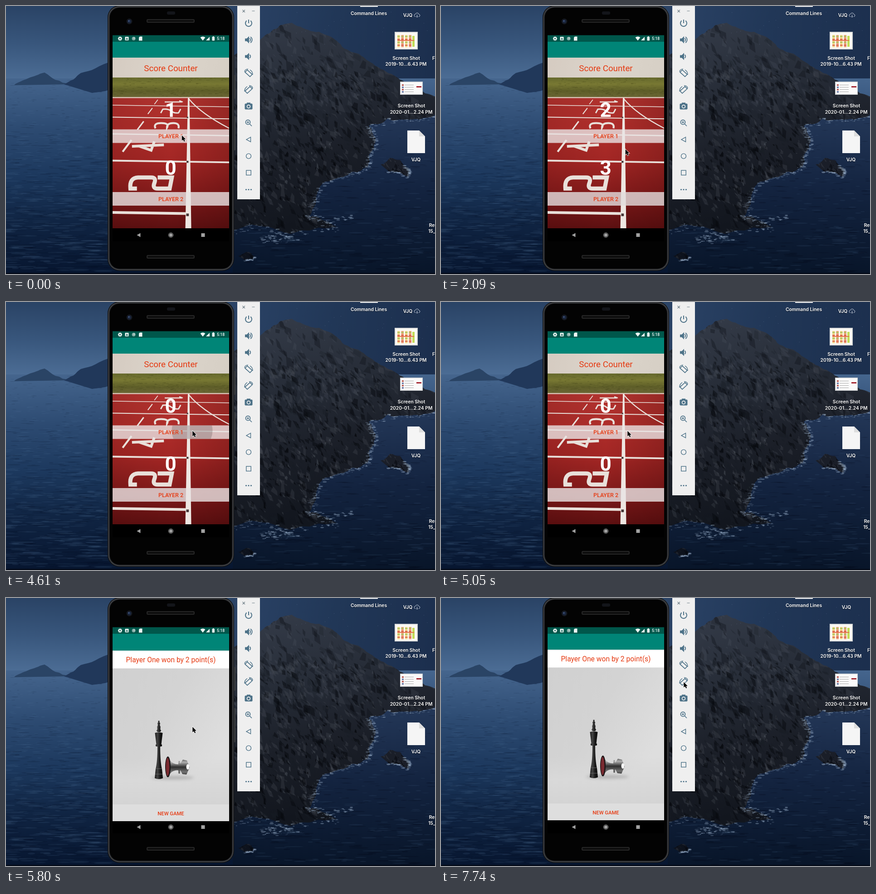
An HTML page with a canvas that plays this animation: 946x592 px, repeating every 8 s.

```html
<!DOCTYPE html>
<html lang="en">
<head>
<meta charset="utf-8">
<title>Score Counter</title>
<style>
html, body { margin: 0; width: 946px; height: 592px; overflow: hidden; background: #0b1930; }
canvas { display: block; }
</style>
</head>
<body>
<canvas id="stage" width="946" height="592"></canvas>
<script>
const W = 946, H = 592, LOOP = 8000, STEP = 148.4;
const RED = '#e63a12', TEAL = '#008577', ROBOTO = 'Roboto, sans-serif';
const LEFT = 235, WIDE = 257, MID = 363.5;
let g = document.getElementById('stage').getContext('2d'), seed = 7;

const rnd = () => (seed = (seed * 16807) % 2147483647) / 2147483647;
const between = (a, b) => a + (b - a) * rnd();
const pick = list => list[Math.floor(rnd() * list.length)];
const times = (n, f) => { for (let i = 0; i < n; i++) f(i); };

function layer(paint) {
  const c = document.createElement('canvas'), old = g;
  c.width = W; c.height = H;
  g = c.getContext('2d');
  paint();
  g = old;
  return c;
}
function rect(x, y, w, h, fill) { g.fillStyle = fill; g.fillRect(x, y, w, h); }
function round(x, y, w, h, r, fill) {
  g.fillStyle = fill; g.beginPath(); g.roundRect(x, y, w, h, r); g.fill();
}
function disc(x, y, r, fill, ry = r) {
  g.fillStyle = fill; g.beginPath(); g.ellipse(x, y, r, ry, 0, 0, 7); g.fill();
}
function ring(x, y, r, color, w) {
  g.strokeStyle = color; g.lineWidth = w; g.beginPath(); g.arc(x, y, r, 0, 7); g.stroke();
}
const asPath = d => d instanceof Path2D ? d : new Path2D(d);
function shape(d, fill) { g.fillStyle = fill; g.fill(asPath(d)); }
function line(d, color, w = 1) { g.strokeStyle = color; g.lineWidth = w; g.stroke(asPath(d)); }
function text(s, x, y, font, fill) {
  g.font = font; g.fillStyle = fill; g.textAlign = 'center'; g.fillText(s, x, y);
}
// Evenly spaced colour stops
function fade(x0, y0, x1, y1, ...colors) {
  const f = g.createLinearGradient(x0, y0, x1, y1);
  colors.forEach((c, i) => f.addColorStop(i / (colors.length - 1), c));
  return f;
}
const down = (y0, y1, ...colors) => fade(0, y0, 0, y1, ...colors);
function inside(d, paint) { g.save(); g.clip(asPath(d)); paint(); g.restore(); }
function at(x, y, paint) { g.save(); g.translate(x, y); paint(); g.restore(); }

// Coastal night scene
function jagged(points, depth = 4, rough = .13) {
  if (!depth) return points;
  const out = [points[0]];
  points.slice(1).forEach(([x, y], i) => {
    const [px, py] = points[i], d = Math.hypot(x - px, y - py) * rough;
    out.push([(x + px) / 2 + between(-d, d), (y + py) / 2 + between(-d, d)], [x, y]);
  });
  return jagged(out, depth - 1, rough);
}
function crags(n, x0, y0, x1, y1, size, colors) {
  times(n, () => {
    const s = between(.25, 1) * size, r = (a, b) => between(a, b) * s;
    shape(`M${between(x0, x1)} ${between(y0, y1)}l${r(.2, .8)} ${r(.1, .6)}l${r(-.1, .5)} ${r(.4, 1)}l${r(-.8, -.3)} ${r(-.6, -.1)}z`, pick(colors));
  });
}
function ripplesOnSea(n, x0, x1, y0, colors) {
  times(n, () => {
    const y = between(y0, H), k = .4 + (y - y0) / 300;
    disc(between(x0, x1), y, between(4, 16) * k, pick(colors), between(.5, 1.3) * k);
  });
}
function rock(points, fill, foamSize) {
  const edge = jagged(points, 3), d = 'M' + edge.join('L') + 'z';
  shape(d, fill);
  inside(d, () => crags(40, points[0][0], points[0][1] - 20, points[0][0] + 70, points[0][1] + 20, 14,
    ['rgba(4,6,12,.5)', 'rgba(80,86,98,.25)']));
  edge.filter(p => p[1] > points[0][1]).forEach(p => foam(p, foamSize));
}
function foam([x, y], spread) {
  times(3, () => disc(x + between(-spread, spread), y + between(-.2, 1) * spread,
    between(1, 5), `rgba(160,182,208,${between(.12, .5)})`, between(.5, 1.5)));
}
function coast() {
  rect(0, 0, W, 165, down(0, 165, '#2a4365', '#38567c', '#4d6e96'));
  rect(500, 0, 446, 260, fade(500, 0, 946, 100, '#2b4366', '#213757', '#1c2f4e'));
  rect(0, 160, W, 432, down(160, H, '#45658d', '#2d4b72', '#1c385d', '#0f2341', '#071630'));
  rect(500, 225, 446, 367, down(225, H, '#25395a', '#13233f', '#081529'));
  ripplesOnSea(900, 0, 230, 164, ['rgba(110,145,185,.1)', 'rgba(4,14,34,.15)']);
  ripplesOnSea(500, 520, W, 250, ['rgba(100,135,175,.1)', 'rgba(0,6,20,.22)']);
  shape('M' + jagged([[18, 175], [48, 160], [85, 147], [137, 173]], 3, .06).join('L'), '#2a4465');
  shape('M' + jagged([[128, 173], [165, 148], [230, 124], [230, 184], [190, 192]], 3, .06).join('L'), '#21385a');

  const ridge = jagged([[500, 110], [560, 75], [606, 42], [630, 37], [712, 66], [746, 94], [850, 150], [946, 200]], 4, .07);
  const shore = jagged([[946, 240], [800, 264], [815, 297], [798, 355], [690, 402], [668, 465], [730, 488], [500, 496]]);
  const land = 'M' + ridge.concat(shore).join('L') + 'z';
  shape(land, fade(600, 40, 700, 470, '#333a47', '#272d38', '#1b1f28', '#12161e'));
  inside(land, () => {
    crags(420, 500, 30, 946, 260, 26, ['rgba(92,98,110,.16)', 'rgba(10,13,20,.32)', 'rgba(30,35,44,.35)']);
    crags(1100, 500, 130, 850, 500, 20, ['rgba(5,7,12,.45)', 'rgba(88,92,101,.22)', 'rgba(24,28,36,.4)']);
    crags(150, 500, 260, 830, 500, 11, ['rgba(125,130,138,.25)', 'rgba(0,2,6,.6)']);
  });
  shore.forEach(p => foam(p, p[1] > 430 ? 10 : 6));
  times(30, () => foam([between(550, 650), between(500, 520)], 6));
  times(6, () => foam([between(728, 775), between(462, 474)], 4));
  rock([[826, 350], [846, 336], [868, 340], [890, 362], [886, 377], [845, 366]], '#1a1e28', 3);
  rock([[512, 552], [535, 543], [547, 555], [528, 562]], '#0d121c', 3);
  times(30, () => disc(between(640, 940), between(2, 90), .5, 'rgba(170,190,220,.35)'));
  rect(0, 589.5, W, 3, '#050b18');
}

// Desktop files
function label(s, x, y) {
  g.shadowColor = 'rgba(0,0,0,.6)'; g.shadowBlur = 2; g.shadowOffsetY = 1;
  text(s, x, y, '600 10.3px Inter, sans-serif', '#fff');
  g.shadowColor = 'transparent';
}
function files() {
  rect(781, 0, 39, 2, '#f2f2f2');
  label('Command Lines', 800, 20);
  rect(857, 57, 51, 39, '#d9dadb'); rect(859, 59, 47, 35, '#fbfaf4');
  times(4, c => {
    rect(863 + c * 8.5, 64, 5.5, 27, c % 2 ? '#eda07c' : '#f3d98c');
    times(4, r => rect(863 + c * 8.5, 66 + r * 6.5, 5.5, 2.5, r % 2 ? '#d9664f' : '#a9c25e'));
  });
  rect(896, 66, 5, 24, '#c3dc58');
  rect(863, 75, 37, 2, '#e3744f');
  label('Screen Shot', 882.5, 119);
  label('2019-10...6.43 PM', 882, 132);
  rect(869, 167, 50, 29, '#d6d8da'); rect(870.5, 168.5, 47, 26, '#fafafa');
  rect(905, 177, 11, 3, '#a52b36');
  times(4, r => {
    rect(873, 173 + r * 5, 4, 3.4, r % 2 ? '#6878a4' : '#b65a55');
    rect(879, 174 + r * 5, 20, 1, '#aaa');
  });
  label('Screen Shot', 894, 224);
  label('2020-01...2.24 PM', 893.5, 237.5);
  shape('M885 275H911L924 288V325H885z', '#f5f5f5');
  shape('M911 275V288H924z', '#dedede');
  label('VJQ', 904, 343);
  label('F', 943, 119);
  label('Re', 939, 488);
  label('15_', 939, 501);
}

// Emulator side panel: icons drawn around their own centres
function speaker(waves) {
  return ink => {
    shape('M-8 -3h4l5 -5v16l-5 -5h-4z', ink);
    times(waves, i => { g.beginPath(); g.arc(0, 0, 4.2 + i * 3.5, -1, 1); g.stroke(); });
  };
}
function turn(side) {
  return ink => {
    g.scale(side, 1);
    line('M-3 -7L8 3 3 8 -8 -2z', ink, 1.7);
    line('M-9 -3Q-8 -9 -1 -9M9 4Q9 -4 3 -7', ink, 1.4);
  };
}
const icons = [
  ink => { line('M0 -8V0', ink, 2); g.beginPath(); g.arc(0, 0, 7, -.9, Math.PI + .9); g.stroke(); },
  speaker(2), speaker(1), turn(1), turn(-1),
  ink => {
    round(-8.5, -6, 17, 13, 2, ink); rect(-4, -8, 8, 3, ink);
    disc(0, .5, 4.3, '#efefef'); disc(0, .5, 2.6, ink);
  },
  ink => { ring(-1.5, -1.5, 5, ink, 1.7); line('M2 2L7 7M-4 -1.5h5M-1.5 -4v5', ink, 1.6); },
  ink => line('M4.5 -5.2v10.4l-9.5 -5.2z', ink, 1.4),
  ink => ring(0, 0, 5.5, ink, 1.4),
  ink => { g.lineWidth = 1.4; g.strokeRect(-5.2, -5.2, 10.4, 10.4); },
  ink => times(3, i => disc(i * 5.5 - 5.5, .5, 1.6, ink)),
];
function panel() {
  const ink = '#4d7288';
  rect(510, 0, 50, 427, '#efefef');
  line('M521.5 8.5l5.5 5.5m0-5.5l-5.5 5.5M542.5 11h6', '#71818a', 1.1);
  icons.forEach((icon, i) => at(535, 38 + i * 36.7, () => {
    g.strokeStyle = ink; g.lineWidth = 1.8;
    icon(ink);
  }));
}

function phone() {
  round(500, 152, 6, 53, 2, '#3b3d40');
  round(500, 243, 6, 76, 2, '#3b3d40');
  ['#131416', '#46484b', '#232427', '#030303'].forEach((c, i) =>
    round(224 + i * 1.6, -1 + i * 1.6, 279 - i * 3.2, 586 - i * 3.2, 26 - i * 1.6, c));
  round(355, 12, 18, 7, 3, '#13151a');
  disc(272, 34, 6.5, '#14171d'); disc(272, 34, 4, '#1b2740'); disc(271, 33, 1.5, '#4a6088');
  for (const y of [29, 550]) {
    round(310, y, 106, 8, 3, '#262626');
    round(312, y + 2, 102, 4, 2, '#0d0d0d');
  }
}

// Running track: everything painted on the ground grows with y
const figures = [
  'M-1 0H.9M.6 -.7L1 0',
  'M-.9 .8L-.7 -.7Q-.2 -1 .1 0T.8 .7L1 -.8',
  'M-.9 .8Q-1.1 -.7 -.45 -.7T0 .6Q0 -.7 .5 -.7T.9 .8',
  'M-1 .1L1 -.2M.4 -.9L.2 .9L-.6 0',
  'M-.65 .75H-.95Q-1 -.7 -.6 -.75H0Q.25 -.75 .15 0T.3 .75H.85L.95 -.75H.3',
];
const spots = [[370, 212], [362, 232], [355, 264], [313, 309], [320, 391]];

function track() {
  const paint = '#e9e0da';
  rect(LEFT, 79, WIDE, 35, TEAL);
  rect(LEFT, 114, WIDE, 44, fade(LEFT, 114, 492, 158, '#d5cbc1', '#dcd5cb', '#d6cfc5'));
  rect(LEFT, 158, WIDE, 44, down(158, 202, '#65682c', '#787833', '#5d5d28', '#6b6635'));
  rect(LEFT, 202, WIDE, 289, down(202, 491, '#b2332f', '#af2d2a', '#a22624', '#811a1a', '#5d1011'));
  rect(LEFT, 202, WIDE, 289, fade(LEFT, 0, 492, 0, 'rgba(50,0,0,.12)', 'rgba(50,0,0,0)', 'rgba(40,0,0,.2)'));
  inside('M235 158H492V491H235z', () => {
    times(350, () => rect(between(LEFT, 492), between(158, 200), between(2, 8), 1, pick(['rgba(40,42,14,.2)', 'rgba(150,145,75,.15)'])));
    rect(LEFT, 201, WIDE, 2.5, '#d7c3b5');
    for (const y of [219, 245.5, 282.5, 341.5, 456]) {
      const end = y > 400 ? 400 : 492;
      line(`M${LEFT} ${y}L${end} ${y + (end - LEFT) * .015}`, paint, 1.5 + (y - 219) * .019);
    }
    line('M403 205Q430 238 492 270', paint, 2.4);
    shape('M401 203H404.5L408.5 491H395.5z', '#eee7e2');
    for (const y of [246, 344, 461]) rect(400 - y / 180, y - y / 180, y / 80, y / 80, '#453536');
    spots.forEach(([x, y], i) => {
      const p = new Path2D(), w = 20 + (y - 212) * .157, h = (y - 150) * .068;
      p.addPath(new Path2D(figures[i]), new DOMMatrix([w, 0, 0, h, x, y]));
      line(p, paint, h * .55);
      if (i < 4) line(`M${331 - (y - 212) * .66 + h * .9} ${y - h * 1.2}l${-h * 1.8} ${h * 2.4}`, paint, h * .4);
    });
    for (const y of [272.5, 411]) rect(LEFT, y, WIDE, 30, 'rgba(234,229,229,.8)');
  });
  text('Score Counter', MID, 143.5, `18.75px ${ROBOTO}`, RED);
}

// Result screen
function result() {
  rect(LEFT, 79, WIDE, 35, TEAL);
  rect(LEFT, 114, WIDE, 40, '#fff');
  rect(LEFT, 114, WIDE, 1.5, '#dedede');
  rect(LEFT, 153.5, WIDE, 300.5, fade(LEFT, 154, 492, 300, '#d0d0d0', '#d3d3d3', '#dedede'));
  rect(LEFT, 350, WIDE, 104, down(350, 454, 'rgba(216,216,216,0)', '#d9d9d9', '#d4d4d4'));
  rect(LEFT, 454, WIDE, 37, '#dedede');
  g.filter = 'blur(3px)';
  disc(367, 395, 47, 'rgba(90,90,90,.3)', 4);
  g.filter = 'none';

  const black = fade(328, 0, 346, 0, '#151515', '#444', '#161616', '#0c0c0c');
  times(3, i => { round(335.5 - i, 269 + i * 8, 3 + i * 2, 9, 1, black); disc(337, 275 + i * 8, 3 + i, black, 2); });
  shape('M328.5 296q8 -3 17 0L342.5 321H331.5z', black);
  round(330, 321, 14, 5, 2, black);
  shape('M334 326H340Q340 360 344 376L346 396Q337 400 328 396L330 376Q334 360 334 326z', black);
  line('M330 375H344M329 387H345', '#777', .8);

  const steel = down(350, 393, '#232323', '#b0b0b0', '#303030', '#737373', '#151515');
  shape('M357 350Q366 367 382 365V379Q366 376 357 393z', steel);
  round(380, 358, 4, 28, 2, steel);
  shape('M384 364L390 355 399 357 405 372 398 388 389 387 384 378z', steel);
  disc(357, 371, 6, '#191516', 23);
  disc(356.5, 371, 4, '#792a30', 20);
  disc(401, 371, 3.5, '#f7f7f7', 6);
  text('Player One won by 2 point(s)', MID, 140, `15.625px ${ROBOTO}`, RED);
  text('NEW GAME', MID, 478.3, `500 11.25px ${ROBOTO}`, RED);
}

function bars() {
  const dark = '#00574b', c = '#eef5f3', grey = '#a2a2a2';
  rect(LEFT, 64.5, WIDE, 14.5, dark);
  at(251.5, 72, () => {
    times(8, () => { g.rotate(Math.PI / 4); rect(-1, -4.6, 2, 4, c); });
    disc(0, 0, 3.4, c); disc(0, 0, 1.5, dark);
  });
  round(262.5, 68, 8, 8, 1, c);
  text('A', 266.5, 74.7, `700 7px ${ROBOTO}`, dark);
  disc(281.5, 72, 4, '#7fa9a2'); disc(282.5, 71, 2.6, '#a6c4bf');
  shape('M295 67.5h5.5v9h-7.5v-7z', c);
  shape('M428.5 69.5q5.5 -4 11 0l-5.5 7z', c);
  shape('M449 68v8h-8z', c);
  round(454.5, 68, 5.5, 8.5, 1, c); rect(456, 67, 2.5, 1.5, c);
  text('5:18', 473.5, 75.2, `500 8.75px ${ROBOTO}`, '#fff');
  shape('M296.5 501.5v9l-8 -4.5z', grey);
  disc(MID, 506, 3.8, grey); ring(MID, 506, 5.2, grey, 1);
  rect(430.5, 502, 8, 8, grey);
}

// Motion, counted in steps. Moves: start, end, x, y
const moves = [[4, 7, 389, 431], [12, 17, 410.5, 284], [45, 52, 534.5, 185]];
const taps = [[2, 19, 26, 31, 38], [8, 10, 12]];
const RESET = 31, SWITCH = 38;
const rowTop = [272.5, 411];
const easeOut = p => 1 - (1 - p) ** 3;

function pointer(n) {
  return moves.reduce(([x, y], [a, b, tx, ty]) => {
    const k = easeOut(Math.min(1, Math.max(0, (n - a) / (b - a))));
    return [x + (tx - x) * k, y + (ty - y) * k];
  }, [387, 285]);
}
function scores(n) {
  const [one, two] = taps.map(list => list.filter(s => s <= n).length);
  return [(1 + one) % 5, n < RESET ? two : 0];
}
function game(n) {
  g.drawImage(trackArt, 0, 0);
  scores(n).forEach((score, i) => {
    const top = rowTop[i];
    for (const age of taps[i].map(s => n - s).filter(a => a >= 0 && a < 3 && n < SWITCH)) {
      const [x, y] = pointer(n - age);
      inside(`M237 ${top}H492v30H237z`, () => disc(x, y, 45 + age * 55, `rgba(70,60,60,${.24 * .4 ** age})`));
    }
    text(score, 363, i ? 373 : 245, `700 44px ${ROBOTO}`, '#fff');
    text('PLAYER ' + (i + 1), MID, top + 19.8, `500 12.5px ${ROBOTO}`, RED);
  });
}
function slideIn(age) {
  inside('M235 79H492V520H235z', () => {
    g.globalAlpha = Math.min(1, .36 + age);
    g.drawImage(resultArt, 0, Math.round(29 * .07 ** age));
  });
}
function cloudLabel(synced) {
  label('VJQ', synced ? 894 : 886, 23.5);
  if (!synced) line('M903 23.5q-3 -.3 -3 -2.8t2.8 -2.6q1 -3 4 -2.8t3.5 3q2.5 .3 2.5 2.6t-2.8 2.6M906.5 19v6m-2 -2l2 2 2 -2', '#d3dae6', .9);
}
function cursor(n) {
  at(...pointer(n), () => {
    const arrow = 'M.8 .8V12.8L3.6 10.3 5.6 14.6 7.7 13.7 5.8 9.5H9.4z';
    line(arrow, '#fff', 1.5);
    shape(arrow, '#000');
  });
}

const scene = layer(() => { coast(); files(); panel(); phone(); });
const trackArt = layer(track), resultArt = layer(result), barArt = layer(bars);

function frame(now) {
  const n = Math.floor((now % LOOP) / STEP);
  g.drawImage(scene, 0, 0);
  cloudLabel(n >= 49);
  rect(LEFT, 64, WIDE, 456, '#000');
  if (n <= SWITCH) game(n);
  else rect(LEFT, 79, WIDE, 35, TEAL);
  if (n >= SWITCH) slideIn(n - SWITCH);
  g.drawImage(barArt, 0, 0);
  cursor(n);
  requestAnimationFrame(frame);
}
requestAnimationFrame(frame);
</script>
</body>
</html>
```
